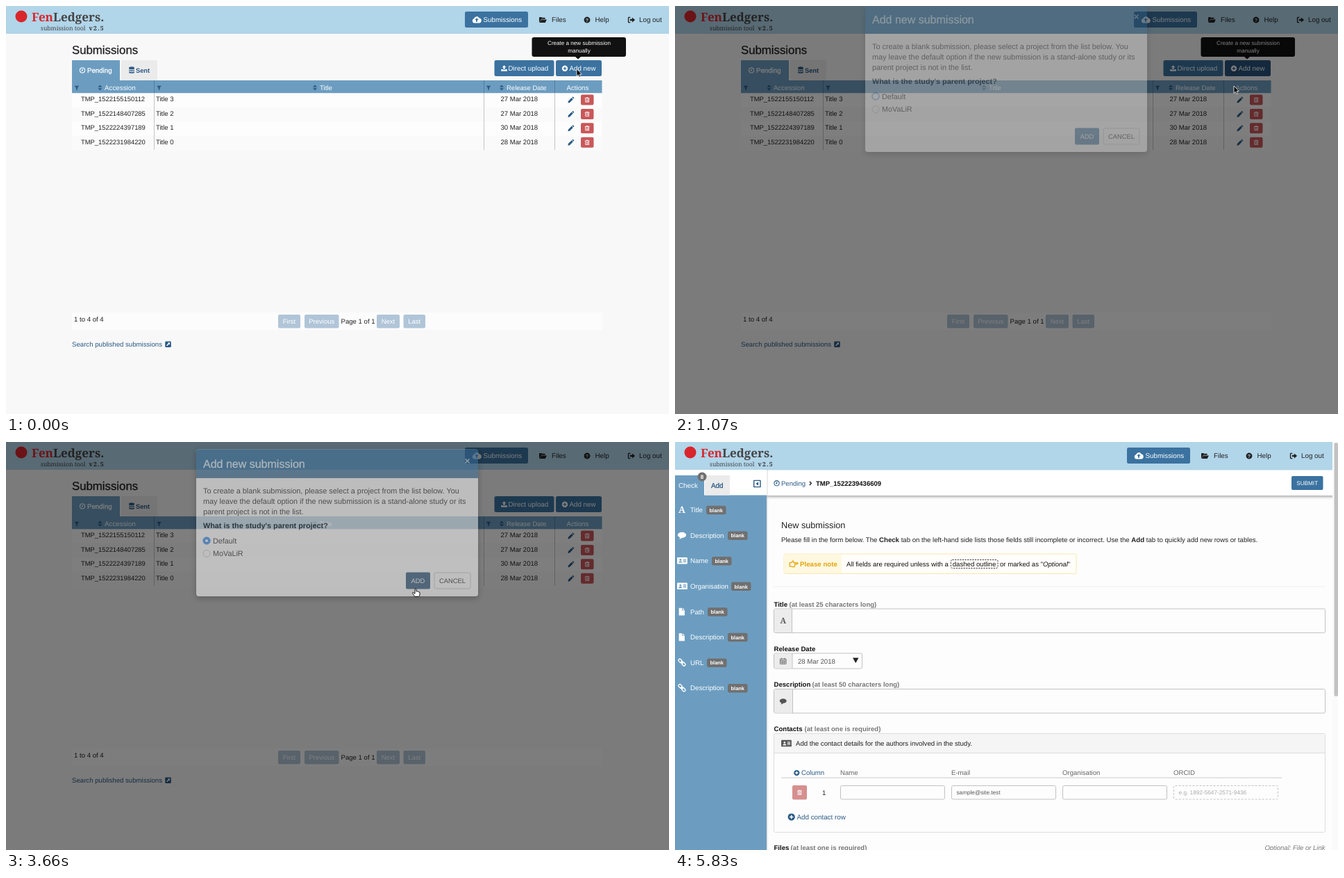
An HTML page that plays this animation: 955x587 px, repeating every 6.27 s.

```html
<!DOCTYPE html>
<html lang="en">
<head>
<meta charset="utf-8">
<title>New submission walkthrough</title>
<style>
  html, body { margin: 0; width: 100%; height: 100%; overflow: hidden; background: #f8f8f8; }
  svg { display: block; }
  text { font-family: "Liberation Sans", Arial, sans-serif; text-rendering: geometricPrecision; white-space: pre; }
  .serif { font-family: "Noto Serif", serif; }
  .b { font-weight: bold; }
  .i { font-style: italic; }
  .m { stroke: currentColor; stroke-width: .3px; }
</style>
</head>
<body>
<svg id="stage" width="955" height="587" viewBox="0 0 955 587"></svg>
<script>
const LOOP = 6270;
const BLUE = '#3b72a0', DARK = '#29527a', PANEL = '#6c9dc0', SKY = '#b1d5e9',
      LINK = '#2b5a85', INK = '#222', RED = '#c9575a';

const solid = d => `<path fill="currentColor" fill-rule="evenodd" d="${d}"/>`;
const line = (d, w) => `<path fill="none" stroke="currentColor" stroke-width="${w}" stroke-linejoin="round" d="${d}"/>`;

// Icons are drawn in a 14-unit box
const ICONS = {
  cloud: solid('M3.500 12.500a3.500 3.500 0 0 1-.5-6.800A4.200 4.200 0 0 1 10.700 4.800a3.900 3.900 0 0 1 0 7.700zM7 4.800 4.200 7.800H6V10.500H8V7.800H9.800z'),
  folder: solid('M0 11V3q0-1 1-1h3q1 0 1 1h5q1 0 1 1v1.500H4L1 11zM.8 12 4 6.500H14L11 12z'),
  help: solid('M7 .5a6.500 6.500 0 1 0 .01 0z') + `<text class="b" x="7" y="10.8" font-size="10.5" text-anchor="middle" fill="${SKY}">?</text>`,
  exit: solid('M5 2H2.500Q1 2 1 3.500v7Q1 12 2.500 12H5v-1.400H2.600V3.400H5zM8 3v2.500H4.500v3H8V11l5-4z'),
  clock: line('M7 1.500a5.500 5.500 0 1 0 .01 0zM7.300 4v3.500H5', 1.7),
  db: solid('M2 3a5 2 0 0 1 10 0v1a5 2 0 0 1-10 0zM2 5.600a5 2 0 0 0 10 0v1.800a5 2 0 0 1-10 0zM2 9a5 2 0 0 0 10 0v2.200a5 2 0 0 1-10 0z'),
  upload: solid('M7 1 3 5.200h2.500V9h3V5.200H11zM1 9h3.500v1.300h5V9H13v4H1z'),
  plus: solid('M7 .5a6.500 6.500 0 1 0 .01 0zM6 3.500h2V6h2.500v2H8v2.500H6V8H3.500V6H6z'),
  filter: solid('M2 2H12L8.400 7v5.500L5.600 10V7z'),
  sort: solid('M7 1 11.500 6H2.500zM7 13 2.500 8H11.500z'),
  pencil: solid('M1 13l.7-3.600L8.500 2.600l2.900 2.900-6.800 6.800zM9.300 1.800 10.300.8q.6-.5 1.200 0l1.700 1.700q.5.6 0 1.200l-1 1z'),
  trash: solid('M5 1h4l.6 1.300H13v1.200h-1V13H2V3.500H1V2.300h3.400zM3.400 3.700v7.800h7.200V3.700zM4.600 5h1v5.400h-1zM6.500 5h1v5.400h-1zM8.400 5h1v5.400h-1z'),
  out: solid('M3 1h8q2 0 2 2v8q0 2-2 2H3q-2 0-2-2V3q0-2 2-2zM6 3.500 7.500 5 3.500 9 5 10.500 9 6.500 10.500 8V3.500z'),
  fold: solid('M2 1h10q1 0 1 1v10q0 1-1 1H2q-1 0-1-1V2q0-1 1-1zM2.600 2.600v8.800h8.800V2.600zM9 4v6L5 7z'),
  letter: '<text class="serif b" x="7" y="12.500" font-size="16" text-anchor="middle" fill="currentColor">A</text>',
  comment: solid('M7 2c4 0 7 2 7 4.700S11 11.400 7 11.400c-1 1-2.600 1.800-4.600 1.800.8-.7 1.200-1.500 1.200-2.500C1.300 9.800 0 8.300 0 6.700 0 4 3 2 7 2z'),
  card: solid('M0 1.500h15q1 0 1 1v9q0 1-1 1H0q-1 0-1-1v-9q0-1 1-1zM9 4.500h5v1H9zM9 6.500h5v1H9zM9 8.500h5v1H9zM4.500 4a1.700 1.700 0 1 0 .01 0zM1.500 10.300q0-2.500 3-2.500t3 2.500z'),
  file: solid('M2 1h5v4h4.500v8.500H2zM8 1l3.500 3.300H8z'),
  link: `<g transform="rotate(45 7 7)">${line('M2 4.800h2.500a2.200 2.200 0 0 1 0 4.400H2a2.200 2.200 0 0 1 0-4.400zM9.500 4.800H12a2.200 2.200 0 0 1 0 4.400H9.500a2.200 2.200 0 0 1 0-4.400zM4.500 7h5', 1.6)}</g>`,
  point: line('M1 5h2.500l2-2.500q1.500-.5 1.500 1L6.500 5H12.500q1.200 1 0 2H8.500q1 1 0 2 .5 1-.5 2.200H5.500L3.500 10.500H1z', 1.3),
  date: line('M1 3h12v10H1zM4 1v3M10 1v3M1 6h12M5 6v7M9 6v7M1 9.500h12', 1.1)
};

const text = (x, y, s, size = 9.6, fill = INK, cls = '', anchor = 'start', extra = '') =>
  `<text x="${x}" y="${y}" font-size="${size}" fill="${fill}" color="${fill}" class="${cls}" text-anchor="${anchor}" ${extra}>${s}</text>`;
const mid = (x, y, s, size, fill, cls) => text(x, y, s, size, fill, cls, 'middle');
// Box given by its edges
const box = (x, y, r, b, fill, radius = 0, stroke = '', extra = '') =>
  `<rect x="${x}" y="${y}" width="${r - x}" height="${b - y}" rx="${radius}" fill="${fill}" ${stroke && `stroke="${stroke}"`} ${extra}/>`;
// Icon given by its centre and size
const icon = (name, x, y, size, color) =>
  `<g color="${color}" transform="translate(${x - size / 2} ${y - size / 2}) scale(${size / 14})">${ICONS[name]}</g>`;
const group = (id, s) => `<g id="${id}">${s}</g>`;
const bold = s => `<tspan class="b">${s}</tspan>`;
const shadow = (id, dy, blur, alpha) =>
  `<filter id="${id}" x="-10%" y="-30%" width="120%" height="180%"><feDropShadow dx="0" dy="${dy}" stdDeviation="${blur}" flood-opacity="${alpha}"/></filter>`;

function header(dx) {
  return box(0, 0, 955, 40, SKY) +
    '<circle cx="22" cy="15" r="8.5" fill="#d8262c"/>' +
    text(37, 22, '<tspan fill="#d8262c">Fen</tspan>Ledgers.', 17, '#444', 'serif b') +
    text(50, 34.5, 'submission tool', 8.6, '#444', 'serif') +
    text(119.5, 34.5, 'v2.5', 8.6, '#333', 'serif b', 'start', 'letter-spacing="1.2"') +
    `<g transform="translate(${dx} 0)">` +
    box(661, 8, 752, 31, BLUE, 2.5) +
    icon('cloud', 678, 19.3, 13.5, '#fff') + text(687.5, 23.3, 'Submissions', 9.8, '#fff') +
    icon('folder', 773.5, 20, 11, INK) + text(786, 23.3, 'Files', 9.8) +
    icon('help', 837, 20, 9.5, INK) + text(848.5, 23.3, 'Help', 9.8) +
    icon('exit', 901, 20, 12, INK) + text(912, 23.3, 'Log out', 9.8) + '</g>';
}

function listPage() {
  const rows = [['1522155150112', '27'], ['1522148407285', '27'], ['1522224397189', '30'], ['1522231984220', '28']];
  let s = box(0, 0, 955, 587, '#f8f8f8') + header(0) +
    text(95, 69, 'Submissions', 16.8, INK, 'm') +
    box(95, 78, 164, 108, PANEL, 1) + box(166, 78, 218, 107, '#ebebeb', 2) +
    icon('clock', 110, 92.5, 9.5, '#fff') + text(117, 96, 'Pending', 9.7, '#fff', 'm') +
    icon('db', 181, 92, 11, LINK) + text(187, 96, 'Sent', 9.3, LINK, 'b') +
    box(703.5, 78, 789.5, 101, BLUE, 2.5) +
    icon('upload', 717.5, 89.5, 10, '#fff') + text(723.5, 93.3, 'Direct upload', 9.8, '#fff') +
    `<g id="addNew">${box(792, 78, 858, 101, 'currentColor', 2.5)}</g>` +
    icon('plus', 805, 89.8, 9, '#fff') + text(811.5, 93.3, 'Add new', 9.75, '#fff') +
    box(95, 107, 858.5, 125.5, PANEL);
  for (const x of [102, 220.5, 695]) s += icon('filter', x, 118, 9, LINK);
  for (const x of [135.5, 445, 714]) s += icon('sort', x, 117.5, 9.5, LINK);
  s += text(142, 121, 'Accession', 9.8, '#fff') + text(452, 121, 'Title', 9.6, '#fff') +
    text(721, 121, 'Release Date', 9.5, '#fff') + text(807.5, 121, 'Actions', 9.7, '#fff');
  rows.forEach(([id, day], n) => {
    const y = 125.5 + 20.4 * n;
    s += box(95, y, 858.5, y + 20.4, n % 2 ? '#fafafa' : '#fdfdfd') +
      text(108, y + 11.8, 'TMP_' + id, 9.4) + text(216, y + 11.8, 'Title ' + (3 - n), 9.5) +
      text(712.5, y + 11.8, day + ' Mar 2018', 9.55) +
      icon('pencil', 813.7, y + 9.7, 10, LINK) +
      box(828, y + 2, 846.5, y + 17, RED, 2) + icon('trash', 837.2, y + 9.5, 8, '#fff');
  });
  for (const x of [213, 688, 790])
    s += box(x, 107, x + 1, 125.5, '#4f7fa3') + box(x, 125.5, x + 1, 207, '#c4c4c4');
  s += box(95, 441, 858.5, 466, '#fcfcfc') + text(98, 453.5, '1 to 4 of 4');
  for (const [x, r, label] of [[392, 424, 'First'], [430, 479.5, 'Previous'], [534, 567, 'Next'], [572.5, 604, 'Last']])
    s += box(x, 444, r, 463.5, '#b1c5d8', 2) + mid((x + r) / 2, 457, label, 9.5, '#fff');
  return s + text(482.5, 457, 'Page 1 of 1') +
    text(95, 490, 'Search published submissions', 9.63, LINK) + icon('out', 233.5, 486.8, 10, LINK) +
    group('tip', box(757.5, 45, 893, 73, '#111', 3) + '<path d="M820 73h8l-4 3.5z" fill="#111"/>' +
      mid(825.5, 56, 'Create a new submission', 8.1, '#fff') + mid(825.5, 67, 'manually', 8.1, '#fff'));
}

function sidebar() {
  const items = [['letter', 'Title', 45], ['comment', 'Description', 76], ['card', 'Name', 53], ['card', 'Organisation', 81],
    ['file', 'Path', 47], ['file', 'Description', 76], ['link', 'URL', 46], ['link', 'Description', 76]];
  let s = box(0, 40, 132, 77, '#fff') + box(0, 76.5, 132, 587, PANEL) + box(0, 48, 42, 78, PANEL) +
    box(43, 48, 79, 76.5, '#ebebeb', 1) + text(5, 66, 'Check', 9.85, '#fff') + text(52, 66, 'Add', 9.9, LINK, 'm') +
    '<circle cx="39" cy="50" r="6.5" fill="#707070"/>' + mid(39, 52.8, '8', 8, '#fff', 'b') +
    icon('fold', 118.3, 60, 12.5, LINK);
  items.forEach(([name, label, x], n) => {
    const y = 97.8 + 36.6 * n;
    s += icon(name, 10, y - .3, name == 'letter' ? 11.5 : 12.2, '#fff') + text(22, y + 3.3, label, 9.7, '#fff') +
      box(x, y - 6, x + 28.5, y + 6.5, '#707070', 2.5) + mid(x + 14.25, y + 2.9, 'blank', 7.4, '#fff', 'b');
  });
  return s;
}

function formPage(dx) {
  const R = 946.5 + dx, EDGE = '#c2c2c2', PAPER = '#fdfdfd', NOTE = '#e5a50a', GREY = '#777';
  const label = (y, name, x, hint) => text(142.5, y, name, 9.6, '#111', 'b') + (hint ? text(x, y, hint, 9.5, GREY, 'b') : '');
  const field = (y, b, r, split, name, size) => box(142.5, y, r, b, PAPER, 2, EDGE) +
    box(143, y + .5, split, b - .5, '#ececec') + box(split, y, split + 1, b, EDGE) + icon(name, 155.7, (y + b) / 2, size, '#555');
  let s = box(0, 0, 955, 587, PAPER) +
    box(132, 40, 955, 77, '#fff', 0, '', 'filter="url(#low)"') + header(dx) + box(132, 40, 955, 41, '#e3edf3') +
    box(132, 40, 134, 587, '#000', 0, '', 'opacity=".08"') + sidebar() +
    icon('clock', 146.5, 59.3, 9.5, LINK) + text(153, 62.5, 'Pending', 9.55, LINK) +
    line('M193.8 56.8l2.600 2.600-2.600 2.600', 1.2) + text(203, 62.5, 'TMP_1522239436609', 9.5, '#111', 'b') +
    box(898 + dx, 49, 943.5 + dx, 69, BLUE, 2) + mid(920.7 + dx, 62, 'SUBMIT', 8.2, '#fff') +
    text(153, 124, 'New submission', 12.7) +
    text(153, 143.5, `Please fill in the form below. The ${bold('Check')} tab on the left-hand side lists those fields still incomplete or incorrect. Use the ${bold('Add')} tab to quickly add new rows or tables.`, 9.63) +
    box(157, 161, 578, 189.5, '#fffefa', 2, '#fae7ae') + box(157.5, 161.5, 240, 189, '#fff8e1') +
    icon('point', 171, 175.5, 13.5, NOTE) + text(180, 178.7, 'Please note', 9.7, NOTE, 'b') +
    text(247, 178.7, 'All fields are required unless with a', 9.5, '#111') +
    box(397.5, 169.5, 465, 181.5, 'none', 2, '#333', 'stroke-dasharray="2.2 1.4"') +
    text(399.7, 178.7, 'dashed outline', 9.65, '#111') +
    text(468, 178.7, 'or marked as "<tspan class="i">Optional</tspan>"', 9.6, '#111') +
    box(142, 207.5, R, 208.5, '#efefef') +
    label(236.5, 'Title', 164.5, '(at least 25 characters long)') + field(240, 274.5, R, 168, 'letter', 10) +
    label(300.5, 'Release Date') + field(304, 326, 269.5, 168.5, 'date', 10) +
    text(177, 318.5, '28 Mar 2018', 9.6, '#555') + '<path d="M256 310.5h8.5l-4.25 7.5z" fill="#222"/>' +
    label(352, 'Description', 197.5, '(at least 50 characters long)') + field(355.5, 390, R, 169, 'comment', 10) +
    label(415.5, 'Contacts', 186.5, '(at least one is required)') +
    box(142.5, 419.5, R, 561.5, PAPER, 2, '#ddd') + box(143, 420, R - .5, 447, '#f5f5f5') + box(143, 447, R - .5, 448, '#ddd') +
    icon('card', 160, 433.5, 12.2, '#555') + text(174, 437, 'Add the contact details for the authors involved in the study.', 9.64) +
    icon('plus', 175.3, 476, 8.8, LINK) + text(182, 479.3, 'Column', 9.6, LINK);
  ['Name', 'E-mail', 'Organisation', 'ORCID'].forEach((name, n) => {
    const x = 238 + 160 * n;
    s += text(x, 479.3, name, 9.6, '#666') +
      box(x + .5, 494.5, x + 150.5, 514, PAPER, 2, EDGE, n == 3 ? 'stroke-dasharray="3 2"' : '');
  });
  return s + box(153, 482.5, 874, 483.5, '#ccc') +
    box(169, 494, 190, 514.5, '#d68f8f', 2) + icon('trash', 179.5, 504.3, 8, '#fff') + text(212, 508, '1') +
    text(405.5, 507, 'sample@site.test', 8.2, '#555') + text(725.5, 507, 'e.g. 1892-5647-2571-9436', 8.25, '#aaa') +
    icon('plus', 167.7, 539.5, 11, LINK) + text(175.5, 543, 'Add contact row', 9.8, LINK) +
    label(587, 'Files', 166.5, '(at least one is required)') +
    text(R, 587, 'Optional: File or Link', 9.5, GREY, 'i', 'end');
}

function dialog() {
  const ring = y => `<circle cx="289" cy="${y}" r="5" fill="#fff" stroke="#bbb" stroke-width=".8"/>`;
  return box(274, 20.5, 680, 232, '#fff', 4, '', 'filter="url(#deep)"') +
    `<path d="M274 62V24.5q0-4 4-4H676q4 0 4 4V62z" fill="${BLUE}"/>` +
    text(284, 46.5, 'Add new submission', 16, '#fff', 'm') + mid(664.5, 42.3, '×', 14, '#fff', 'b') +
    text(284, 84, 'To create a blank submission, please select a project from the list below. You', 10.88) +
    text(284, 99, 'may leave the default option if the new submission is a stand-alone study or its', 10.88) +
    text(284, 114, 'parent project is not in the list.', 10.88) +
    text(284, 134, "What is the study's parent project?", 10.82, INK, 'b') +
    ring(152) + ring(170.5) + '<circle cx="289" cy="152" r="5" fill="none" stroke="#69aef5" stroke-width="1.6"/>' +
    group('dot', '<circle cx="289" cy="152" r="5" fill="#2f86f0"/><circle cx="289" cy="152" r="2" fill="#fff"/>') +
    text(298, 155.7, 'Default', 10.8) + text(298, 174, 'MoVaLiR', 10.8) +
    `<g id="addBtn">${box(576, 197.5, 611, 221.5, 'currentColor', 2)}</g>` + mid(593.5, 212.6, 'ADD', 9.4, '#fff') +
    box(617, 198, 669, 221, '#fff', 2, '#ccc') + mid(643, 212.6, 'CANCEL', 9.4);
}

const stage = document.getElementById('stage');
stage.innerHTML = `<defs>${shadow('low', 1.5, 2, .4)}${shadow('deep', 3, 4, .45)}</defs>` +
  group('list', listPage()) + group('wide', formPage(0)) +
  group('form', formPage(-10) + box(947, 0, 955, 587, '#fafafa') + box(949.5, 1, 955, 366, '#c2c2c2', 2.7)) +
  group('shade', box(0, 0, 955, 587, '#000')) + group('modal', dialog()) +
  group('arrow', '<path d="M0 0V10.5L2.4 8.3 3.9 11.7 5.7 10.9 4.2 7.6H7.3z" fill="#000" stroke="#fff" stroke-width=".8"/>') +
  group('hand', '<path d="M-1 1Q0-.6 1 1V4.5Q2 3.5 2.8 4.7 4 4 4.5 5.2 6 5 6 6.5V8.5Q6 10.5 4.5 12H-1Q-2.5 10-4.5 7-4.5 5.5-2.8 6.3L-1 7.8z" fill="#fff" stroke="#000" stroke-width=".9"/>');
const el = Object.fromEntries([...stage.querySelectorAll('g[id]')].map(g => [g.id, g]));

// Steps: start time, then the values held until the next step
const POINTER = [[0, 'arrow', 822, 90.5], [450, 'hand', 822, 91], [1070, 'arrow', 805, 115], [1250, 'arrow', 715, 195],
  [1430, 'arrow', 659, 234.5], [1580, 'arrow', 600, 222], [1720, 'arrow', 430, 184], [1870, 'arrow', 305, 156],
  [2010, 'arrow', 289, 151], [2310, 'arrow', 350, 162], [2460, 'arrow', 520, 196], [2610, 'arrow', 589, 210],
  [2760, 'hand', 590, 210.5], [3810, 'arrow', 589, 209.5], [5210, 'arrow', 692, 402], [5365, 'arrow', 790, 515],
  [5520, 'arrow', 880, 545], [5675, 'arrow', 911, 570], [5830, '', 0, 0]];
const PAGE = [[0, 'list'], [3810, 'wide'], [4130, 'form']];
const SHADE = [[0, 0], [930, .28], [1070, .5], [3960, .45], [4130, 0]];
const MODAL = [[0, 0, 0], [1070, .3, -22], [1250, .8, -6], [1430, 1, 0], [3660, .5, -10], [3810, 0, 0]];

const at = (steps, t) => steps.findLast(s => s[0] <= t);
const show = (g, on) => g.style.display = on ? '' : 'none';

function draw(t) {
  const [, kind, x, y] = at(POINTER, t), page = at(PAGE, t)[1], [, alpha, dy] = at(MODAL, t);
  for (const id of ['list', 'wide', 'form']) show(el[id], id == page);
  for (const id of ['arrow', 'hand']) {
    show(el[id], id == kind);
    el[id].setAttribute('transform', `translate(${x} ${y})`);
  }
  el.shade.setAttribute('opacity', at(SHADE, t)[1]);
  show(el.modal, alpha > 0);
  el.modal.setAttribute('opacity', alpha);
  el.modal.setAttribute('transform', `translate(0 ${dy})`);
  show(el.tip, t < 1250);
  show(el.dot, t >= 2160);
  el.addNew.setAttribute('color', t >= 450 && t < 1250 ? DARK : BLUE);
  el.addBtn.setAttribute('color', t >= 2610 ? DARK : BLUE);
}

const start = performance.now();
function tick() {
  draw((performance.now() - start) % LOOP);
  requestAnimationFrame(tick);
}
draw(0);
requestAnimationFrame(tick);
</script>
</body>
</html>
```
